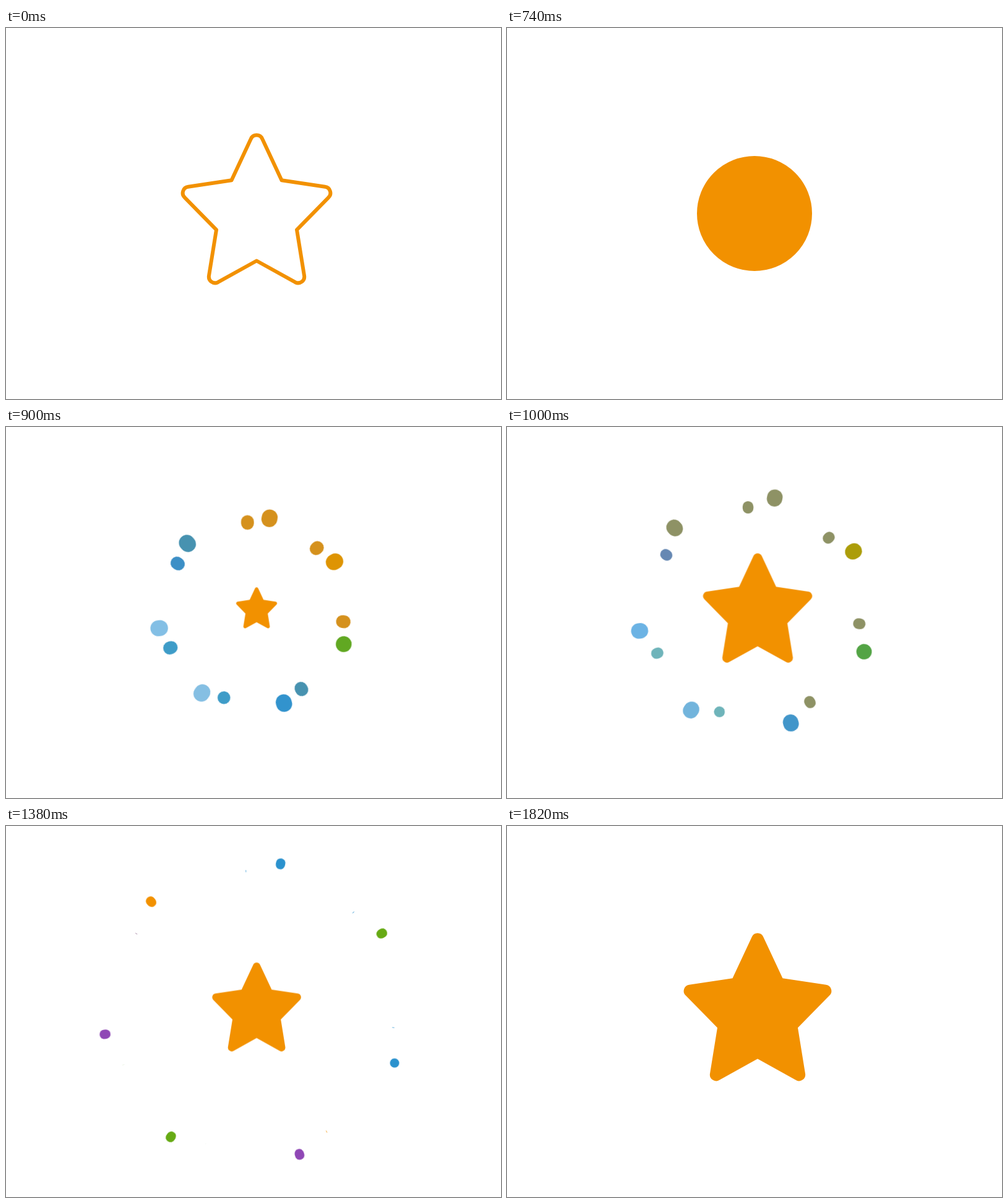
An HTML page without scripts for the animation above (2320 ms loop, 800x600 px).

```html
<!DOCTYPE html>
<html lang="en">
<head>
<meta charset="utf-8">
<title>Star burst</title>
<style>
  html, body { margin: 0; width: 100%; height: 100%; overflow: hidden; background: #fff; }
  svg { display: block; width: 800px; height: 600px; }

  /* Everything moves on a 20 ms beat; 1 ms lead keeps beats off the boundary. */
  .outline, .ring, .star, .dots path { animation: 2320ms steps(1) -1ms infinite; }

  .outline { fill: none; stroke: #f29100; stroke-width: 6; stroke-linejoin: round; animation-name: outline; }
  .ring { fill: none; stroke: #f29100; animation-name: ring; }
  .star { fill: #f29100; transform-origin: 405px 292.3px; animation-name: star; }
  .dots path { fill: none; stroke-linecap: round; }
  .dots .big { animation-name: big; }
  .dots .small { animation-name: small; }

  @keyframes outline {
    0% { opacity: 1; }
    28.448%, 100% { opacity: 0; }
  }

  @keyframes ring {
    0% { r: 0; stroke-width: 0; }
    28.448% { r: 7px; stroke-width: 14px; animation-timing-function: steps(2); }
    30.172% { r: 27px; stroke-width: 54px; animation-timing-function: steps(2); }
    31.897% { r: 46.5px; stroke-width: 93px; animation-timing-function: steps(1); }
    32.759% { r: 54.5px; stroke-width: 109px; animation-timing-function: steps(2); }
    34.483% { r: 89.25px; stroke-width: 84.5px; animation-timing-function: steps(2); }
    36.207% { r: 117.5px; stroke-width: 41px; animation-timing-function: steps(3); }
    38.793%, 100% { r: 141px; stroke-width: 0; }
  }

  @keyframes star {
    0% { transform: scale(0); }
    36.207% { transform: scale(0); animation-timing-function: steps(8); }
    43.103% { transform: scale(.739); animation-timing-function: steps(2); }
    44.828% { transform: scale(.9); animation-timing-function: steps(2); }
    46.552% { transform: scale(.97); animation-timing-function: steps(2); }
    48.276% { transform: scale(.95); animation-timing-function: steps(4); }
    51.724% { transform: scale(.84); animation-timing-function: steps(4); }
    55.172% { transform: scale(.71); animation-timing-function: steps(3); }
    57.759% { transform: scale(.625); animation-timing-function: steps(2); }
    59.483% { transform: scale(.601); animation-timing-function: steps(3); }
    62.069% { transform: scale(.63); animation-timing-function: steps(4); }
    65.517% { transform: scale(.75); animation-timing-function: steps(4); }
    68.966% { transform: scale(.89); animation-timing-function: steps(5); }
    73.276%, 100% { transform: scale(1); }
  }

  @keyframes big {
    0% { transform: translateY(-141px); stroke-width: 0; stroke: var(--a); }
    37.069% { transform: translateY(-141px); stroke-width: 26px; stroke: var(--a); animation-timing-function: steps(7); }
    43.103% { transform: translateY(-188px); stroke-width: 25px; stroke: var(--b); animation-timing-function: steps(5); }
    47.414% { transform: translateY(-212px); stroke-width: 24px; animation-timing-function: steps(5); }
    51.724% { transform: translateY(-228.4px); stroke-width: 22px; stroke: var(--c); animation-timing-function: steps(9); }
    59.483% { transform: translateY(-242.7px); stroke-width: 15px; stroke: var(--d, var(--c)); animation-timing-function: steps(21); }
    77.586%, 100% { transform: translateY(-276px); stroke-width: 0; stroke: var(--d, var(--c)); }
  }

  @keyframes small {
    0% { transform: translateY(-136px); stroke-width: 0; stroke: var(--a); }
    37.069% { transform: translateY(-136px); stroke-width: 22px; stroke: var(--a); animation-timing-function: steps(7); }
    43.103% { transform: translateY(-170.3px); stroke-width: 17.5px; stroke: var(--b); animation-timing-function: steps(5); }
    47.414% { transform: translateY(-188.5px); stroke-width: 12px; animation-timing-function: steps(5); }
    51.724% { transform: translateY(-204.7px); stroke-width: 7px; stroke: var(--c); animation-timing-function: steps(9); }
    59.483% { transform: translateY(-227.3px); stroke-width: .8px; stroke: var(--d, var(--c)); animation-timing-function: steps(1); }
    60.345%, 100% { transform: translateY(-229px); stroke-width: 0; stroke: var(--d, var(--c)); }
  }

  /* Colour stops shared by several dots */
  .toBlue { --a: #f29100; --b: #8e9265; --c: #2b92ce; }
  .toOrange { --a: #2b92ce; --b: #8e9265; --c: #f29100; }
  .toPale { --a: #2b92ce; --b: #6fb4ba; --c: #b2d8a8; --d: #e4f0dc; }
</style>
</head>
<body>
<svg viewBox="0 0 800 600">
  <defs>
    <path id="shape" d="M364.5 246.3 L395.7 179.5 A10.1 10.1 0 0 1 414.3 179.5 L445.5 246.3
      L515.5 256.8 A10.1 10.1 0 0 1 521 274.3 L470 326.3 L482 400.5 A10.1 10.1 0 0 1 467.5 411.2
      L405 376.5 L342.5 411.2 A10.1 10.1 0 0 1 328 400.5 L340 326.3 L289 274.3
      A10.1 10.1 0 0 1 294.5 256.8 Z"/>
  </defs>

  <circle class="ring" cx="400" cy="300" r="0"/>

  <g class="dots" transform="translate(400 300)">
    <g transform="rotate(11.65)"><path class="big toBlue" d="M-5.4 -1.35v2.7"/></g>
    <g transform="rotate(59.95)"><path class="big" d="M-5.4 -1.35v2.7" style="--a:#f29100;--b:#ac9d0a;--c:#66aa14"/></g>
    <g transform="rotate(111.35)"><path class="big" d="M-5.4 0v.01" style="--a:#66aa14;--b:#53a445;--c:#3a9898;--d:#2b92ce"/></g>
    <g transform="rotate(163.45)"><path class="big" d="M-5.4 -1.35v2.7" style="--a:#2b92ce;--b:#4296ca;--c:#6874c4;--d:#8f47b5"/></g>
    <g transform="rotate(214.65)"><path class="big" d="M-5.4 -1.35v2.7" style="--a:#8cc4e6;--b:#72b4dc;--c:#449b84;--d:#66aa14"/></g>
    <g transform="rotate(262.55)"><path class="big" d="M-5.4 -1.35v2.7" style="--a:#8cc4e6;--b:#6cb3e4;--c:#5073c6;--d:#8f47b5"/></g>
    <g transform="rotate(318.3)"><path class="big toOrange" d="M-5.4 -1.35v2.7"/></g>

    <g transform="rotate(-1.7)"><path class="small toBlue" d="M-5.4 -1.35v2.7"/></g>
    <g transform="rotate(46.6)"><path class="small toBlue" d="M-5.4 -1.35v2.7"/></g>
    <g transform="rotate(97.95)"><path class="small toBlue" d="M-5.4 -1.35v2.7"/></g>
    <g transform="rotate(150.1)"><path class="small toOrange" d="M-5.4 -1.35v2.7"/></g>
    <g transform="rotate(201.25)"><path class="small toPale" d="M-5.4 0v.01"/></g>
    <g transform="rotate(249.1)"><path class="small toPale" d="M-5.4 -1.35v2.7"/></g>
    <g transform="rotate(305)"><path class="small" d="M-5.4 -1.35v2.7" style="--a:#2b92ce;--b:#6688b3;--c:#a3809f"/></g>
  </g>

  <use class="star" href="#shape"/>
  <use class="outline" href="#shape"/>
</svg>
</body>
</html>
```
